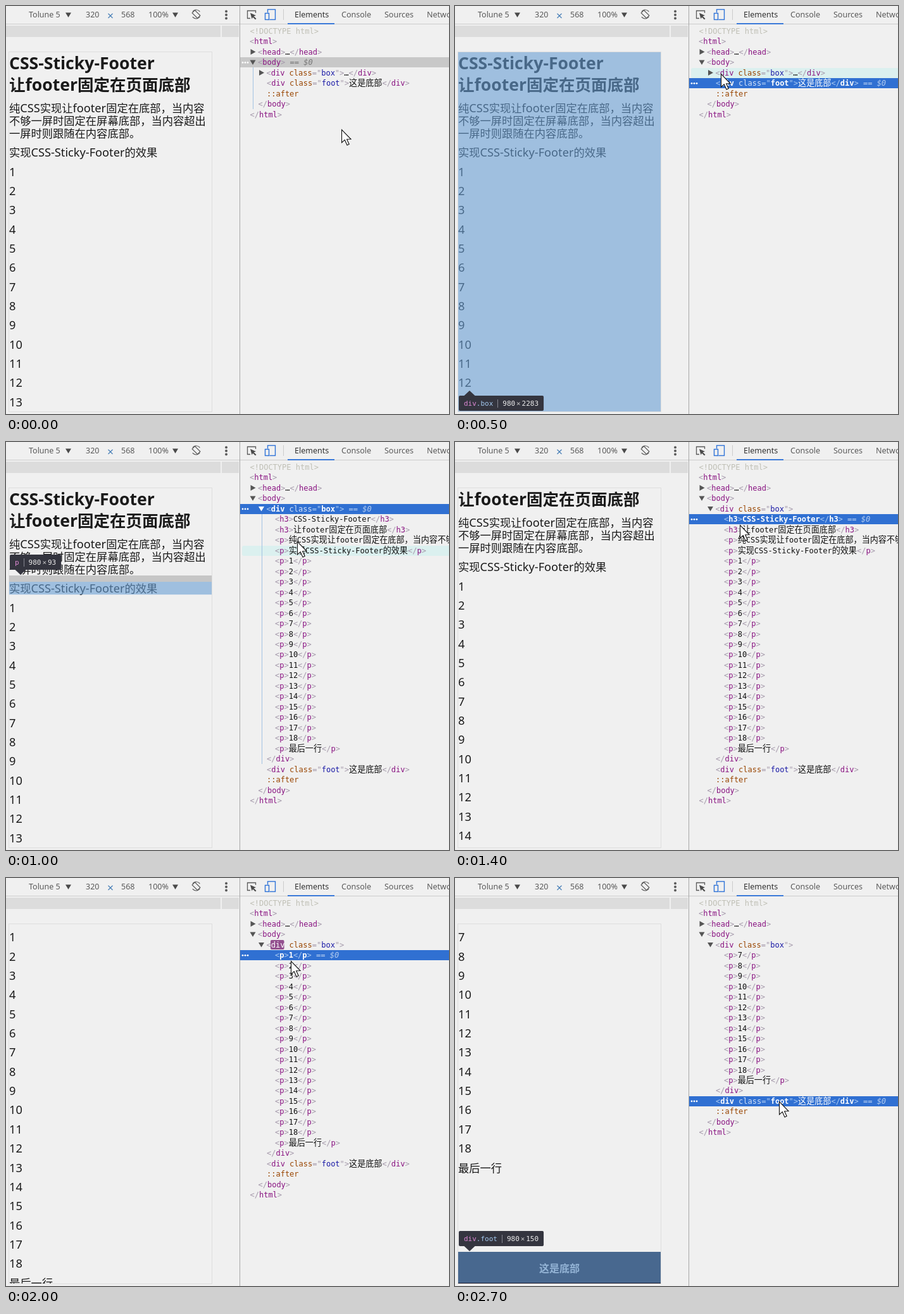
Recreate the animation shown at these times as an HTML page with a canvas. Size 700 px wide and 645 px high, loop 4.7 s.

```html
<!DOCTYPE html>
<html lang="zh-CN">
<head>
<meta charset="utf-8">
<title>CSS-Sticky-Footer</title>
<style>
html, body { margin: 0; width: 100%; height: 100%; overflow: hidden; background: #f0f0f0; }
canvas { display: block; }
</style>
</head>
<body>
<canvas id="stage" width="700" height="645"></canvas>
<script>
const ctx = document.getElementById('stage').getContext('2d');
const LOOP = 4700;
const CJK = '"Noto Sans CJK SC", "Noto Sans CJK", sans-serif';
const SANS = '"Noto Sans", "Open Sans", sans-serif';
const MONO = '"DejaVu Sans Mono", monospace';
const BG = '#f0f0f0';
const OVERLAY = 'rgba(104,159,213,.59)';
const ROW = 16.47;

// Page content: tag, text lines, height
const blocks = [
  { tag: 'h3', lines: ['CSS-Sticky-Footer'], h: 34 },
  { tag: 'h3', lines: ['让footer固定在页面底部'], h: 34 },
  { tag: 'p', h: 69.5, lines: ['纯CSS实现让footer固定在底部\uff0c当内容',
    '不够一屏时固定在屏幕底部\uff0c当内容超出', '一屏时则跟随在内容底部。'] },
  { tag: 'p', lines: ['实现CSS-Sticky-Footer的效果'], h: 30.7 }
];
for (let i = 1; i <= 18; i++) blocks.push({ tag: 'p', lines: [String(i)], h: 30.35 });
blocks.push({ tag: 'p', lines: ['最后一行'], h: 30.35 });

// Each step overrides part of the state from its time on
const steps = [
  [0, { page: 0, panel: 0, open: false, sel: 'body', hover: null, flash: false, at: [530, 195] }],
  [200, { hover: 'foot', at: [484, 121] }],
  [400, { sel: 'foot', at: [476, 114] }],
  [500, { hover: 'box', at: [420, 107] }],
  [700, { sel: 'box', at: [403, 107] }],
  [800, { open: true }],
  [1000, { hover: 3, at: [460, 157] }],
  [1100, { hover: 1, at: [453, 139] }],
  [1200, { hover: 0, at: [450, 131] }],
  [1300, { sel: 'first' }],
  [1400, { page: 1, hover: null }],
  [1500, { panel: 1, flash: true }],
  [1600, { page: 2, flash: false }],
  [1700, { panel: 2, flash: true }],
  [1800, { page: 3, panel: 3 }],
  [2000, { page: 4, panel: 4 }],
  [2100, { page: 5, panel: 5 }],
  [2200, { page: 6, panel: 6 }],
  [2300, { page: 8, panel: 8 }],
  [2400, { page: 9, panel: 9 }],
  [2500, { page: 10, panel: 10 }],
  [2600, { hover: 'foot', flash: false, at: [508, 345] }],
  [2700, { sel: 'foot', at: [512, 353] }]
];

function stateAt(t) {
  return Object.assign({}, ...steps.filter(s => s[0] <= t).map(s => s[1]));
}

function rect(x, y, w, h, color) {
  ctx.fillStyle = color;
  ctx.fillRect(x, y, w, h);
}

function rounded(x, y, w, h, r, color) {
  ctx.fillStyle = color;
  ctx.beginPath();
  ctx.roundRect(x, y, w, h, r);
  ctx.fill();
}

function poly(points, fill, stroke) {
  ctx.beginPath();
  points.forEach(p => ctx.lineTo(p[0], p[1]));
  ctx.closePath();
  if (fill) { ctx.fillStyle = fill; ctx.fill(); }
  if (stroke) { ctx.strokeStyle = stroke; ctx.lineWidth = 1.1; ctx.stroke(); }
}

function line(points, color, width) {
  ctx.beginPath();
  points.forEach(p => ctx.lineTo(p[0], p[1]));
  ctx.strokeStyle = color;
  ctx.lineWidth = width;
  ctx.stroke();
}

function dot(x, y, r, color) {
  ctx.fillStyle = color;
  ctx.beginPath();
  ctx.arc(x, y, r, 0, 7);
  ctx.fill();
}

// Whole-pixel baselines keep small type crisp
function label(str, x, y, font, color) {
  ctx.font = font;
  ctx.fillStyle = color;
  ctx.fillText(str, x, Math.round(y));
  return x + ctx.measureText(str).width;
}

// Latin and Chinese runs use separate fonts
function mixed(str, x, y, latin, han, color) {
  for (const run of str.match(/[\u2e80-\u9fff\uff00-\uffef]+|[^\u2e80-\u9fff\uff00-\uffef]+/g) || [])
    x = label(run, x, y, /[\u2e80-\uffef]/.test(run) ? han : latin, color);
  return x;
}

function triangle(x, y, down, color) {
  poly(down ? [[x - 4.5, y - 3.5], [x + 4.5, y - 3.5], [x, y + 4]]
            : [[x - 3.5, y - 4.5], [x + 4.5, y], [x - 3.5, y + 4.5]], color);
}

function toolbar() {
  const font = '12.5px ' + SANS, grey = '#5a5a5a';
  rect(0, 28, 369, 1, '#cccccc');
  rect(0, 31, 339, 18, '#dcdcdc');
  rect(341, 31, 27, 18, '#dcdcdc');
  label('Tolune 5', 36, 18, font, grey);
  triangle(98.5, 14, true, '#4a4a4a');
  label('320', 126, 18, font, grey);
  line([[161.5, 12], [168.5, 19]], '#4a80b8', 1.2);
  line([[168.5, 12], [161.5, 19]], '#4a80b8', 1.2);
  label('568', 182, 18, font, grey);
  label('100%', 225, 18, font, grey);
  triangle(267.5, 14, true, '#4a4a4a');
  for (const y of [8.5, 14, 19.5]) dot(348, y, 2, grey);

  ctx.save();
  ctx.translate(300.5, 13);
  ctx.strokeStyle = grey;
  ctx.lineWidth = 1.2;
  for (const a of [-2.5, 0.6]) {
    ctx.beginPath();
    ctx.arc(0, 0, 7, a, a + 1.9);
    ctx.stroke();
  }
  ctx.rotate(-Math.PI / 4);
  ctx.strokeRect(-3, -6, 6, 12);
  ctx.restore();

  rect(369, 0, 1, 645, '#a8a8a8');
  rect(370, 28, 330, 1, '#cccccc');
  rect(445, 27, 74, 2, '#3b7ad9');
  rect(438, 5, 1, 17, '#cccccc');
  line([[386, 19.5], [381.5, 19.5], [381.5, 7.5], [394.5, 7.5], [394.5, 11]], grey, 1.3);
  poly([[386, 11], [395, 15], [391.5, 16.2], [395.5, 20], [394, 21.5], [390, 17.7], [388.5, 20.5]], '#4a4a4a');
  ctx.strokeStyle = '#2f73d8';
  ctx.lineWidth = 1.4;
  ctx.strokeRect(413.5, 5.5, 12, 16);
  rect(408.5, 10.5, 8, 12, BG);
  ctx.strokeRect(409.5, 11.5, 6, 10);
  label('Elements', 456, 18, font, '#333333');
  label('Console', 530, 18, font, grey);
  label('Sources', 598, 18, font, grey);
  label('Network', 665, 18, font, grey);
}

function tip(tag, cls, height, top, bottom) {
  const above = top - 33 >= 72;
  const y = above ? Math.min(608, top - 33) : Math.min(616, bottom + 8);
  const font = '11px ' + MONO, dark = '#34353f';
  const cell = 6.62, num = String(height);
  const sep = 14 + (tag + cls).length * cell + 7;
  const nx = sep + 8;
  const end = nx + 3 * cell + 10.4 + num.length * cell;
  rounded(6, y, end + 8 - 6, 24, 2, dark);
  const edge = above ? y + 24 : y;
  poly([[14.5, edge], [31.5, edge], [23, edge + (above ? 8 : -8)]], dark);
  const x = label(tag, 14, y + 16, font, '#e08ad6');
  label(cls, x, y + 16, font, '#a3c8ee');
  rect(Math.round(sep), y + 6, 1, 13, '#858690');
  label('980', nx, y + 16, font, '#ededed');
  label('×', nx + 3 * cell + 1.9, y + 16, font, '#c8c8c8');
  label(num, nx + 3 * cell + 10.4, y + 16, font, '#ededed');
}

function drawPage(s) {
  ctx.strokeStyle = '#dedede';
  ctx.lineWidth = 1;
  ctx.strokeRect(4.5, 72.5, 321, 569);
  ctx.save();
  ctx.beginPath();
  ctx.rect(5, 73, 320, 568);
  ctx.clip();

  let y = 74, target = null;
  blocks.slice(s.page).forEach((b, i) => {
    const head = b.tag === 'h3';
    const latin = head ? 'bold 26.6px ' + SANS : '18.2px ' + SANS;
    const han = head ? 'bold 25.5px ' + CJK : '17.28px ' + CJK;
    const hit = s.hover === i + s.page;
    if (hit && !head) rect(5, y - .5, 320, 10, '#c6c6c6');
    b.lines.forEach((str, n) => mixed(str, 5, y + 26.3 + n * 20, latin, han, '#1a1a1a'));
    if (hit) {
      const pad = head ? 0 : 9.5;
      rect(5, y + pad, 320, b.h - pad - 1, OVERLAY);
      target = [b.tag, '', head ? 104 : Math.round(b.h / .3265) - 1, Math.round(y - .4), Math.round(y + b.h)];
    }
    y += b.h;
  });

  const foot = Math.max(591, Math.round(y + 10));
  rect(5, foot, 320, 50, '#1c1b2c');
  label('这是底部', 133, foot + 32, 'bold 16px ' + CJK, '#d4d4d8');
  if (s.hover === 'foot') {
    rect(5, foot, 320, 49, OVERLAY);
    target = ['div', '.foot', 150, foot, foot + 49];
  }
  if (s.hover === 'box') {
    rect(5, 73, 320, 568, OVERLAY);
    target = ['div', '.box', 2283, 73, 641];
  }
  ctx.restore();
  if (target) tip(...target);
}

function makeRows(s) {
  const rows = [
    { x: 385.5, src: '<!DOCTYPE html>', plain: '#c0c0b6' },
    { x: 385, src: '<html>' },
    { x: 398, src: '<head>…</head>', arrow: 'right' },
    { x: 398, src: '<body>', arrow: 'down', id: 'body' }
  ];
  if (s.open) {
    rows.push({ x: 411.5, src: '<div class="box">', arrow: 'down', id: 'box' });
    blocks.slice(s.panel).forEach((b, i) => rows.push(
      { x: 425, src: `<${b.tag}>${b.lines.join('')}</${b.tag}>`, id: i + s.panel }));
    rows.push({ x: 412, src: '</div>', ends: 'box' });
  } else {
    rows.push({ x: 411.5, src: '<div class="box">…</div>', arrow: 'right', id: 'box' });
  }
  rows.push(
    { x: 412, src: '<div class="foot">这是底部</div>', id: 'foot' },
    { x: 412, src: '::after', plain: '#994500' },
    { x: 398.5, src: '</body>', ends: 'body' },
    { x: 385.5, src: '</html>' });
  return rows;
}

const inks = { mark: '#a59aab', tag: '#881280', attr: '#994500', value: '#1a1aa6', text: '#111111' };
const litInks = { mark: '#a9c9f2', tag: '#ffffff', attr: '#d3e2f8', value: '#ffffff', text: '#ffffff' };

function code(src, x, y, lit, flash) {
  let inTag = false, quoted = false, named = false;
  for (const part of src.match(/<\/?|[>"=\s]|[^<>"=\s]+/g)) {
    let kind = 'text';
    if (part[0] === '<') { kind = 'mark'; inTag = true; named = false; }
    else if (part === '>') { kind = 'mark'; inTag = false; }
    else if (inTag && part === '"') { kind = 'mark'; quoted = !quoted; }
    else if (inTag && part === '=') kind = 'mark';
    else if (inTag && part !== ' ') {
      kind = quoted ? 'value' : named ? 'attr' : 'tag';
      named = true;
    }
    const bold = lit && kind !== 'mark' && kind !== 'attr' ? 'bold ' : '';
    let color = (lit ? litInks : inks)[kind];
    if (flash && kind === 'tag') {
      rounded(x - .8, y - 12, 21.6, 15, 2, '#93508f');
      color = '#ffffff';
    }
    x = mixed(part, x, y, bold + '12px ' + MONO, '13.1px ' + CJK, color);
  }
  return x;
}

function drawPanel(s) {
  const rows = makeRows(s);
  const sel = s.sel === 'first' ? s.panel : s.sel;
  const selRow = rows.findIndex(r => r.id === sel);
  const endRow = rows.findIndex(r => r.ends === sel);
  rows.forEach((r, i) => {
    const mid = 40 + i * ROW, top = Math.round(mid - 8.2);
    const on = i === selRow, lit = on && sel !== 'body';
    if (on) {
      rect(370, top, 330, 16, lit ? '#3070d2' : '#c8c8c8');
      for (const x of [374, 378, 382]) dot(x, mid, 1.4, '#ffffff');
    } else if (r.id !== undefined && r.id === s.hover) {
      rounded(373, top, 340, 16, 3, '#dbf0ef');
    }
    if (r.arrow) {
      const down = r.arrow === 'down';
      triangle(r.x - 8, mid - .5, down, lit ? '#ffffff' : '#555555');
    }
    if (r.plain) {
      label(r.src, r.x, mid + 4, '12px ' + MONO, r.plain);
      return;
    }
    const end = code(r.src, r.x, mid + 4, lit, s.flash && r.id === 'box');
    if (on) label('== $0', end + 7.2, mid + 4, 'italic 12px ' + MONO, lit ? '#b4cdf0' : '#777777');
  });
  if (endRow > 0) {
    const y0 = Math.round(40 + selRow * ROW + 8);
    const y1 = Math.round(40 + endRow * ROW + 8);
    rect(sel === 'box' ? 404 : 390, y0, 1, y1 - y0, '#a3c3e3');
  }
}

function pointer(x, y) {
  const shape = [[0, 0], [0, 20.5], [4.8, 16.2], [8.5, 24.5], [11.7, 23], [8.1, 15.2], [14.5, 15]];
  poly(shape.map(p => [x + .5 + p[0], y + .5 + p[1]]), '#ffffff', '#111111');
}

function frame(now) {
  const s = stateAt(now % LOOP);
  rect(0, 0, 700, 645, BG);
  toolbar();
  drawPage(s);
  drawPanel(s);
  pointer(...s.at);
  requestAnimationFrame(frame);
}
requestAnimationFrame(frame);
</script>
</body>
</html>
```
